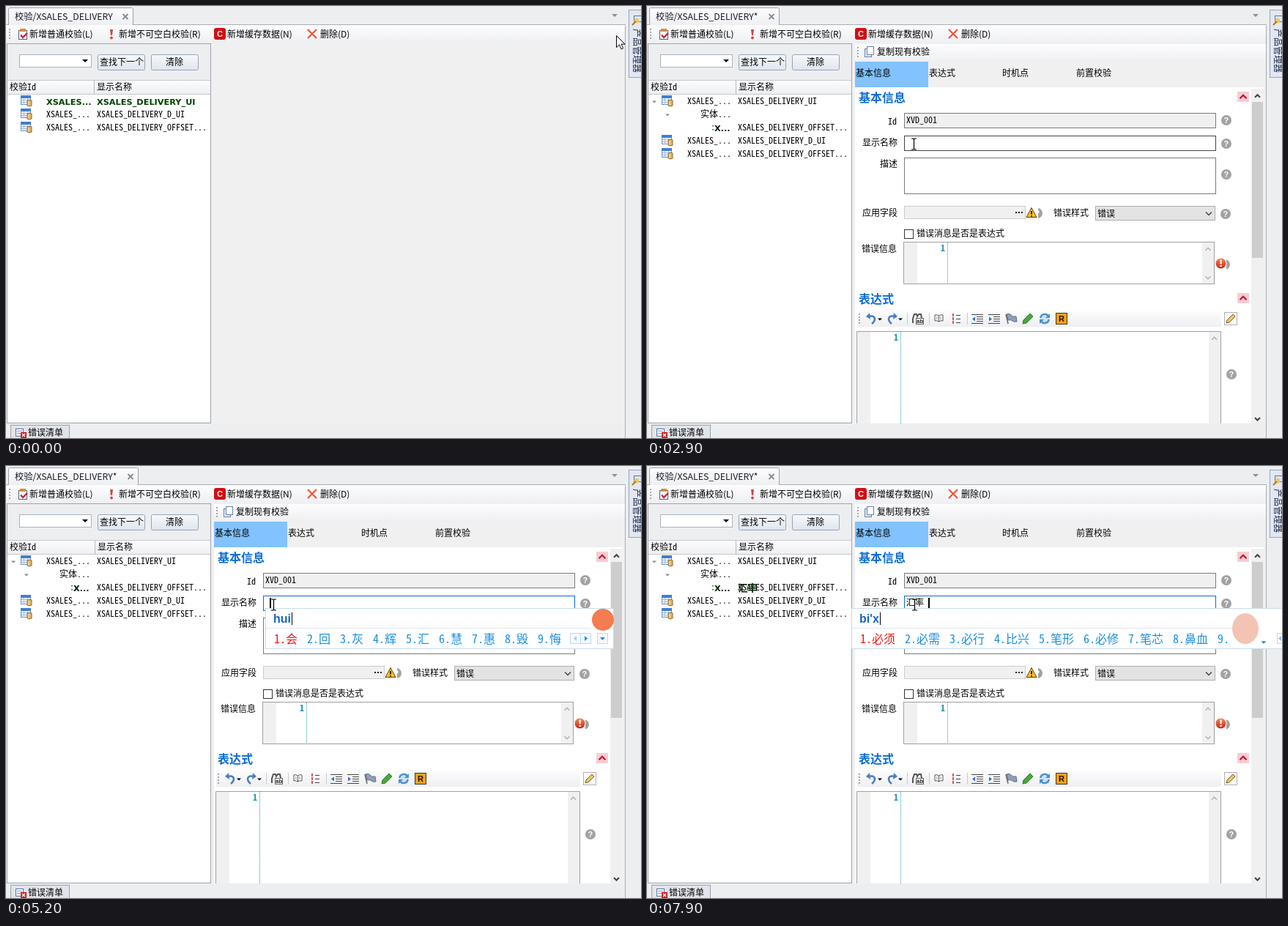
An HTML page for the animation above (8 s loop, 867 px wide and 590 px high).

```html
<!DOCTYPE html>
<html lang="zh-CN">
<head>
<meta charset="utf-8">
<title>校验</title>
<style>
html, body { margin: 0; width: 100%; height: 100%; overflow: hidden; background: #eceef0; }
svg { display: block; width: 867px; height: 590px; }
text { white-space: pre; font-size: 12px; }
.u { font-family: "Noto Sans CJK SC", "Noto Sans", sans-serif; }
.m { font-family: "Noto Sans Mono CJK SC", "Noto Sans CJK SC", monospace; }
.b { font-family: "DejaVu Sans", "Noto Sans CJK SC", sans-serif; font-weight: bold; }
.l { font-family: "Liberation Sans", Arial, sans-serif; font-weight: bold; }
.h { font-family: "Noto Sans CJK SC", sans-serif; font-weight: 600; }
.n { font-family: "Noto Sans Mono CJK SC", monospace; font-weight: bold; }
</style>
</head>
<body>
<svg id="stage" viewBox="0 0 867 590" xmlns="http://www.w3.org/2000/svg"></svg>
<script>
const stage = document.getElementById('stage');

// Drawing helpers; text is placed by its left edge and vertical middle.
const rect = (x, y, w, h, fill, line) => line
  ? `<rect x="${x + .5}" y="${y + .5}" width="${w - 1}" height="${h - 1}" fill="${fill}" stroke="${line}"/>`
  : `<rect x="${x}" y="${y}" width="${w}" height="${h}" fill="${fill}"/>`;
const path = (d, fill = 'none', line = 'none', w = 1) =>
  `<path d="${d}" fill="${fill}" stroke="${line}" stroke-width="${w}"/>`;
const text = (x, y, s, cls = 'm', fill = '#000', size = 12) =>
  `<text class="${cls}" x="${x}" y="${y + size * .37}" fill="${fill}" style="font-size:${size}px">${s}</text>`;
const circle = (x, y, r, fill) => `<circle cx="${x}" cy="${y}" r="${r}" fill="${fill}"/>`;
const group = (id, body) => `<g id="${id}">${body}</g>`;
const at = (x, y, body, turn = '') => `<g transform="translate(${x} ${y}) ${turn}">${body}</g>`;
const down = (x, y, r, fill = '#000') => path(`M${x - r} ${y - r / 2}h${2 * r}l${-r} ${r}z`, fill);
const chevron = (x, y, r, dir, line, w = 1.5) =>
  path(`M${x - r} ${y - dir * r / 2}l${r} ${dir * r}l${r} ${-dir * r}`, 'none', line, w);
const dashed = (x, y, h, line, w) =>
  `<path d="M${x} ${y}v${h}" stroke="${line}" stroke-width="${w}" stroke-dasharray="${w} ${w}"/>`;
const grip = (x, y, h) => dashed(x, y, h, '#a5a8ad', 2);
const dots = (x, y, h) => dashed(x + .5, y, h, '#1f9fb0', 1);
const help = (x, y) => circle(x, y, 7, '#a2a2a2') + text(x - 3.4, y, '?', 'l', '#fff', 11);

const tableIcon = (x, y) => at(x, y,
  rect(0, 0, 14, 13, '#fff', '#6a8fc0') + rect(0, 0, 14, 4, '#3f7fd0') +
  path('M1 6.5h12M1 9.5h12M4.5 4v9M9.5 4v9', 'none', '#9db9dd') +
  path('M9 7q3-2 6 0v7q-3 2-6 0z', '#e3b160', '#8a6a3a') + path('M11 8v6', 'none', '#fff0c8'));

function frame() {
  const tools =
    at(16, 31, rect(1, 2, 12, 13, '#fff', '#4a5f90') + rect(3, 0, 8, 4, '#d88a3c') +
      path('M4 8.5l3 3.5 6-6', 'none', '#c62828', 2.4)) +
    path('M142 32h4l-1 8h-2z', '#d04848') + circle(144, 43.5, 1.9, '#d04848') +
    `<rect x="284" y="30" width="16" height="16" rx="3" fill="#d40d12"/>` +
    text(288, 38, 'C', 'l', '#fff', 11) +
    path('M412 32l12 12M424 32l-12 12', 'none', '#f0553a', 2.2) +
    text(32, 38.5, '新增普通校验(L)', 'u') +
    text(154, 38.5, '新增不可空白校验(R)', 'u') +
    text(302, 38.5, '新增缓存数据(N)', 'u') +
    text(429, 38.5, '删除(D)', 'u');
  return rect(0, 0, 867, 590, '#eceef0') +
    rect(0, 25, 846, 1, '#a9adb3') + rect(0, 26, 845, 25, 'url(#bar)') +
    down(831, 13, 4, '#8b8f96') +
    group('tab', '') + grip(5, 31, 15) +
    group('hover', rect(10, 26, 122, 24, 'url(#hot)', '#2f86d8')) + tools +
    rect(280, 51, 565, 519, '#f0f0f0') +
    rect(845, 27, 1, 563, '#a9adb3') +
    rect(850, 5, 20, 93, '#e3e7f1', '#9aa2bd') +
    at(854, 12, rect(3, 1, 11, 9, '#dce9fa', '#4a78b8') + circle(7, 8, 3.5, '#f0c860') +
      path('M1 14l5-5', 'none', '#b07818', 2)) +
    at(861.5, 31, text(0, 0, '产品管理器', 'u', '#1c2a4a'), 'rotate(90)') +
    rect(6, 572, 81, 20, '#e1e4ea', '#9a9fa8') +
    at(13, 577, rect(0, 0, 11, 11, '#fff', '#5a74a8') + path('M2 3.5h7M2 6.5h5', 'none', '#7a94c8') +
      rect(7, 5, 8, 8, '#d02020') + path('M9 7l4 4M13 7l-4 4', 'none', '#fff', 1.3)) +
    text(30, 583, '错误清单', 'u');
}

function side() {
  const green = '#004200', dark = '#032003';
  const button = (x, tx, s) =>
    `<rect x="${x + .5}" y="66.5" width="64" height="21" rx="2" fill="url(#btn)" stroke="#98a3b8"/>` + text(tx, 77, s, 'u');
  return rect(1, 51, 279, 519, '#fff', '#a0a4aa') + rect(2, 52, 277, 49, '#eceef0') +
    rect(18, 66, 99, 18, '#fff', '#abb2be') + down(108, 75, 4) +
    button(125, 128, '查找下一个') + button(198, 218, '清除') +
    rect(2, 101, 277, 20, 'url(#bar)') + rect(2, 101, 277, 1, '#c4c8ce') + rect(2, 120, 277, 1, '#c4c8ce') +
    text(5, 111, '校验Id') +
    group('treeA', rect(120, 102, 1, 18, '#b4b8be') + text(124, 111, '显示名称') +
      [130, 148, 166].map(y => tableIcon(20, y - 8)).join('') +
      text(55, 130.5, 'XSALES...', 'b', green, 11.3) +
      text(124, 130.5, 'XSALES_DELIVERY_UI', 'b', green, 11.3) +
      text(55, 148, 'XSALES_...') + text(124, 148, 'XSALES_DELIVERY_D_UI') +
      text(55, 166, 'XSALES_...') + text(124, 166, 'XSALES_DELIVERY_OFFSET...') +
      group('trail1', path('M258 121v13l4-3 2 4 1-4h4z', '#fff', '#0a6a0a')) +
      group('trail2', path('M109 126v10l3-2 6 3z', '#fff', '#0a8a0a'))) +
    group('treeB', rect(121, 102, 1, 18, '#b4b8be') + text(125, 111, '显示名称') +
      down(10, 131, 3, '#8c8c8c') + down(28, 149, 3, '#8c8c8c') +
      [130, 184, 202].map(y => tableIcon(20, y - 8) + text(55, y, 'XSALES_...')).join('') +
      text(73, 148, '实体...') +
      path('M90 163v1.5M90 168v1.5', 'none', '#333', 1.5) + text(92, 166.5, 'X...', 'b', dark, 11.3) +
      text(124, 130, 'XSALES_DELIVERY_UI') + text(124, 166, 'XSALES_DELIVERY_OFFSET...') +
      text(124, 184, 'XSALES_DELIVERY_D_UI') + text(124, 202, 'XSALES_DELIVERY_OFFSET...') +
      group('rate', text(124.5, 166.5, '汇率', 'b', dark, 13)));
}

const scroller = h => rect(825, 113, 17, 457, '#f0f0f0') + rect(826, 131, 15, h, '#cdcdcd') +
  chevron(833.5, 123, 3.5, -1, '#404040', 2) + chevron(833.5, 564, 3.5, 1, '#404040', 2);

function skeleton() {
  const block = (x, y, x2, y2) => rect(x, y, x2 - x, y2 - y, '#f0f0f0');
  return rect(284, 113, 558, 457, '#fff') +
    block(287, 117, 800, 138) + block(806, 117, 822, 131) + block(327, 152, 344, 169) +
    block(292, 180, 346, 198) + block(316, 209, 345, 228) + block(292, 276, 346, 295) +
    block(351, 273, 597, 291) + block(609, 276, 663, 295) + block(668, 273, 825, 293) +
    block(351, 302, 498, 322) + block(291, 325, 345, 344) + block(350, 322, 775, 380) +
    block(781, 345, 797, 361) + block(287, 392, 825, 413) + block(286, 415, 825, 440) +
    block(286, 444, 825, 570) +
    rect(351, 146, 426, 21, '#f0f0f0', '#7a7a7a') + rect(351, 177, 426, 21, '#f0f0f0', '#7a7a7a') +
    rect(351, 207, 480, 50, '#fff', '#7a7a7a') + scroller(268);
}

function editorTools() {
  const indent = (x, d) => at(x, 420, path('M0 1.5h16M7 4.5h9M7 7.5h9M7 10.5h9M0 13.5h16', 'none', '#444') +
    path(d > 0 ? 'M1 4.5l4 3-4 3z' : 'M5 4.5l-4 3 4 3z', '#2a6fd0'));
  const arc = path('M3 5q8-2 9 3 0 4-4 7', 'none', '#4a7cc8', 2.6) + path('M0 5l5-5 1 9z', '#4a7cc8');
  return rect(287, 416, 497, 22, 'url(#bar)') + grip(290, 420, 15) +
    at(299, 419, arc) + down(318, 428, 3) +
    at(342, 419, arc, 'scale(-1 1)') + down(346, 428, 3) + rect(355, 419, 1, 16, '#c8cbd0') +
    at(362, 420, path('M1 13v-6l2-6h3l1 3 2-3h3l1 5', 'none', '#555', 2) + rect(5, 6, 11, 9, '#f4f4f4', '#666') +
      text(6, 10.5, 'ab', 'l', '#222', 8)) +
    rect(385, 419, 1, 16, '#c8cbd0') +
    path('M393 422q3-1 5.5 1 3-2 5.5-1v8q-3-1-5.5 1-3-2-5.5-1zM398.5 423v8', '#fff', '#555') +
    path('M395 425h2M395 427h2M400 425h2M400 427h2', 'none', '#888') +
    path('M418 420v4M418 425v4M418 430v4', 'none', '#c83030', 1.6) +
    path('M422 422.5h6M422 427.5h6M422 432.5h6', 'none', '#444') +
    rect(437, 419, 1, 16, '#c8cbd0') + indent(443, -1) + indent(466, 1) +
    path('M490 421l3 13', 'none', '#666', 1.5) + path('M491 421q4-2 6 1t7 2l1 7q-4 1-6-1t-6-1z', '#8fa0b8', '#5c6c84') +
    path('M513 434l1-5 9-9 4 4-9 9z', '#4aa83c', '#2e7828') +
    rect(537, 421, 12, 12, '#cfe2f6') +
    path('M537 426q2-6 8-5l4 3M549 428q-2 6-8 5l-4-3', 'none', '#4a90d2', 2.4) +
    path('M550 420v6h-6zM536 434v-6h6z', '#4a90d2') +
    rect(558, 419, 16, 16, '#f5a21c', '#4a3410') + text(562, 427, 'R', 'l', '#201000', 11) +
    rect(788, 418, 18, 18, '#fdfdfd', '#b0b0b0') + path('M791 433l1-4 8-8 3 3-8 8z', '#f0c860', '#705828');
}

function form() {
  const head = (y, s) => text(289, y, s, 'h', '#0a6cd6', 16) +
    rect(806, y - 8, 16, 14, '#f6cdd3') + chevron(814, y - 1, 4.5, -1, '#cc1030', 2.2);
  const warning = rect(518, 275, 16, 16, '#fff') + path('M525 275.5l7 13h-14z', '#fbc02a', '#5a4208') +
    rect(524.2, 280, 1.6, 4.5, '#000') + rect(524.2, 286, 1.6, 1.6, '#000');
  const failure = rect(777, 344, 14, 18, '#fff') + circle(783.5, 351.5, 7, 'url(#ball)') +
    rect(782.5, 346.5, 2.2, 6, '#fff') + rect(782.5, 354, 2.2, 2, '#fff');
  return rect(284, 52, 561, 24, 'url(#bar)') + grip(288, 56, 14) +
    rect(297, 58, 10, 12, '#dfe9f8', '#6a82ac') + rect(300, 55, 10, 12, '#fff', '#6a82ac') +
    text(314, 63, '复制现有校验', 'u') +
    rect(284, 76, 100, 35, '#82c2ff') +
    text(285, 92, '基本信息') + text(385, 92, '表达式') + text(485, 92, '时机点') + text(586, 92, '前置校验') +
    rect(284, 111, 558, 459, '#fff') + scroller(213) +
    head(125, '基本信息') + head(400, '表达式') +
    text(329, 158, 'Id') + text(294, 186.5, '显示名称') + text(318, 215.5, '描述') + text(294, 282.5, '应用字段') +
    text(555, 282.5, '错误样式') + text(293, 331.5, '错误信息') + text(368, 310.5, '错误消息是否是表达式') +
    rect(351, 146, 426, 21, '#f0f0f0', '#7a7a7a') + text(354, 156, 'XVD_001') +
    `<rect id="name" x="351.5" y="177.5" width="425" height="20" fill="#fff"/>` +
    group('typed', text(354, 187, '汇率')) +
    rect(351, 207, 426, 50, '#fff', '#7a7a7a') +
    rect(351, 273, 166, 18, '#f0f0f0', '#ccc') +
    [503, 507, 511].map(x => rect(x, 281, 2, 2, '#222')).join('') +
    rect(612, 273, 164, 20, '#e3e3e3', '#adadad') + text(615, 283.5, '错误') + chevron(767, 283.5, 4, 1, '#444') +
    help(791, 156) + help(791, 188) + help(791, 230) + help(533, 283) + help(790, 284) + help(789, 353) + help(798, 503) +
    rect(351, 305, 13, 13, '#fff', '#333') +
    rect(350, 322, 425, 58, '#fff', '#a0a0a0') + rect(351, 323, 18, 56, '#f0f0f0') + rect(758, 323, 16, 56, '#f0f0f0') +
    text(401, 331, '1', 'n', '#1f93a8') + dots(410, 323, 56) +
    chevron(766, 332, 3.5, -1, '#b0b0b0') + chevron(766, 371, 3.5, 1, '#b0b0b0') +
    group('alerts', warning + failure) + editorTools() +
    path('M286.5 570V444.5H783.5V570', '#fff', '#a0a0a0') + rect(287, 445, 18, 125, '#f0f0f0') + rect(767, 445, 16, 125, '#f0f0f0') +
    text(337, 453, '1', 'n', '#1f93a8') + dots(346, 445, 125) + chevron(774.5, 454, 3.5, -1, '#b0b0b0');
}

const stops = (id, a, b) => `<linearGradient id="${id}" x2="0" y2="1"><stop stop-color="${a}"/><stop offset="1" stop-color="${b}"/></linearGradient>`;
stage.innerHTML = '<defs>' + stops('bar', '#fdfdfe', '#eeeff2') + stops('hot', '#86c0f2', '#a2d2fb') +
  stops('btn', '#f8f9fb', '#dfe4ee') + stops('ball', '#f58a5a', '#cc2410') + '</defs>' +
  frame() + side() + group('skeleton', skeleton()) + group('form', form()) +
  group('caret', '') + group('ime', '') +
  group('arrow', path('M.5.5v16l4-3.6 2.6 6 2.6-1.2-2.6-5.6h5z', '#fff', '#000')) +
  group('beam', path('M-3.5-7.5h2.5l1 1 1-1h2.5M-3.5 7.5h2.5l1-1 1 1h2.5M0-6.5v13', 'none', '#000', 1.2));

const $ = id => document.getElementById(id);
const show = (id, on) => $(id).setAttribute('display', on ? 'inline' : 'none');
const last = (list, t) => list.filter(k => k[0] <= t).pop();

const pointer = [
  [0, 833, 40], [100, 560, 74], [200, 257, 119], [300, 150, 127], [400, 108, 130], [600, 108, 129],
  [900, 104, 116], [1000, 99, 92], [1100, 95, 70], [1200, 90, 50], [1300, 88, 42], [1400, 87, 40],
  [2400, 140, 75], [2500, 220, 120], [2600, 300, 160], [2700, 350, 182], [2800, 363, 188], [2900, 365, 188], [3200, 366, 189]
];
const blinks = [[0, 0], [2800, 1], [3000, 0], [3200, 1], [3400, 0], [3700, 1], [3900, 0], [4100, 1], [4400, 0], [4600, 1]];
// time, left edge, typed letters, candidates
const entries = [
  [0],
  [4800, 354, 'h', '或 好 和 后 很 会 还 回 哈'],
  [5100, 354, 'hu', '胡 虎 湖 户 互 护 呼 忽 壶'],
  [5200, 354, 'hui', '会 回 灰 辉 汇 慧 惠 毁 悔'],
  [5600, 299, "hui'l", '回来 会来 汇率 回落 回流 会聊 回路 回礼'],
  [5700, 299, "hui'lv", '汇率 会旅 灰绿 回旅 会律 灰驴 回绿 惠律'],
  [6100],
  [7100, 378, 'b', '不 把 吧 被 并 比 本 白 边'],
  [7600, 378, 'bi', '比 笔 必 闭 币 毕 避 鼻 壁'],
  [7800, 279, "bi'x", '必须 必需 必行 比兴 笔形 必修 笔芯 鼻血 ']
];

function ime([, x, typed, words]) {
  if (!typed) return '';
  const list = words.split(' '), wide = list[0].length > 1;
  const right = wide ? 880 : x + 476, step = 29 + 16 * list[0].length;
  const blue = '#1a8ee0', pager = x + 416;
  const square = (px, d, fill = blue) => rect(px, 228, 15, 15, '#f4f9fe', '#bcd8f0') + path(d, fill);
  return rect(x, 194, right - x, 56, '#fff', '#c6dcee') + rect(x + 1, 221, Math.min(right - x - 32, 520), 1, '#dfe7ee') +
    `<text id="letters" class="l" x="${x + 11}" y="214" fill="#1464c8" style="font-size:16px">${typed}</text>` +
    `<rect id="mark" y="200" width="1" height="17" fill="#000"/>` +
    list.map((w, i) => text(x + 12 + i * step, 236, `${i + 1}.${w}`, 'm', i ? blue : '#f01818', 16)).join('') +
    (wide
      ? rect(793, 222, 74, 27, '#fff') + `<ellipse cx="817" cy="222" rx="18" ry="21" fill="#f3c4b4"/>` +
        down(842, 241, 3.5, blue) + square(860, 'M866 232v7l-4-3.5z', '#8cc0ec')
      : square(pager, `M${pager + 9} 232v7l-4-3.5z`, '#a8cdec') +
        square(pager + 14, `M${pager + 20} 232v7l4-3.5z`) +
        square(pager + 37, `M${pager + 41} 234h7l-3.5 4z`) + circle(x + 461, 210, 15, '#f37c50'));
}

function title(edited) {
  const w = edited ? 178 : 171, x = edited ? 170 : 163;
  return path(`M3.5 26V4.5q0-2 2-2H${w + .5}q2 0 2 2V26`, 'url(#bar)', '#9aa0a8') +
    text(12, 14.5, '校验/XSALES_DELIVERY' + (edited ? '*' : ''), 'u', '#1a1a2a', 12.3) +
    path(`M${x - 3.5} 11l7 7M${x + 3.5} 11l-7 7`, 'none', '#868a92', 1.8);
}

let shown = -1;
function draw(t) {
  if (t === shown) return;
  shown = t;
  const edited = t >= 2300, full = t >= 2400, beam = t >= 2700;
  $('tab').innerHTML = title(edited);
  show('hover', t >= 1200 && t < 2400);
  show('treeA', !edited);
  show('treeB', edited);
  show('trail1', t >= 300);
  show('trail2', t >= 900);
  show('skeleton', t >= 2100 && !full);
  show('form', full);
  show('rate', t >= 6100);
  show('typed', t >= 6100);
  show('alerts', last(blinks, t)[1]);
  $('name').setAttribute('stroke', t >= 3100 ? '#0a6cd0' : '#444');

  const [, px, py] = last(pointer, t);
  $('arrow').setAttribute('transform', `translate(${px} ${py})`);
  $('beam').setAttribute('transform', `translate(${px - .5} ${py + .5})`);
  show('arrow', !beam);
  show('beam', beam);

  const entry = last(entries, t), base = t >= 6100 ? 378 : 354;
  $('ime').innerHTML = ime(entry);
  if (entry[2]) {
    const wide = $('letters').getComputedTextLength();
    $('mark').setAttribute('x', Math.round(entry[1] + 12 + wide));
  }
  const thin = (t >= 3500 && t < 3800) || (t >= 4300 && t < 4800) || (t >= 6100 && t < 6600);
  $('caret').innerHTML = entry[2] ? rect(base + 6, 180, 2, 14, '#000') : thin ? rect(base, 180, 1, 12, '#000') : '';
}

function tick() {
  draw(Math.floor(performance.now() % 8000 / 100) * 100);
  requestAnimationFrame(tick);
}
tick();
</script>
</body>
</html>
```
